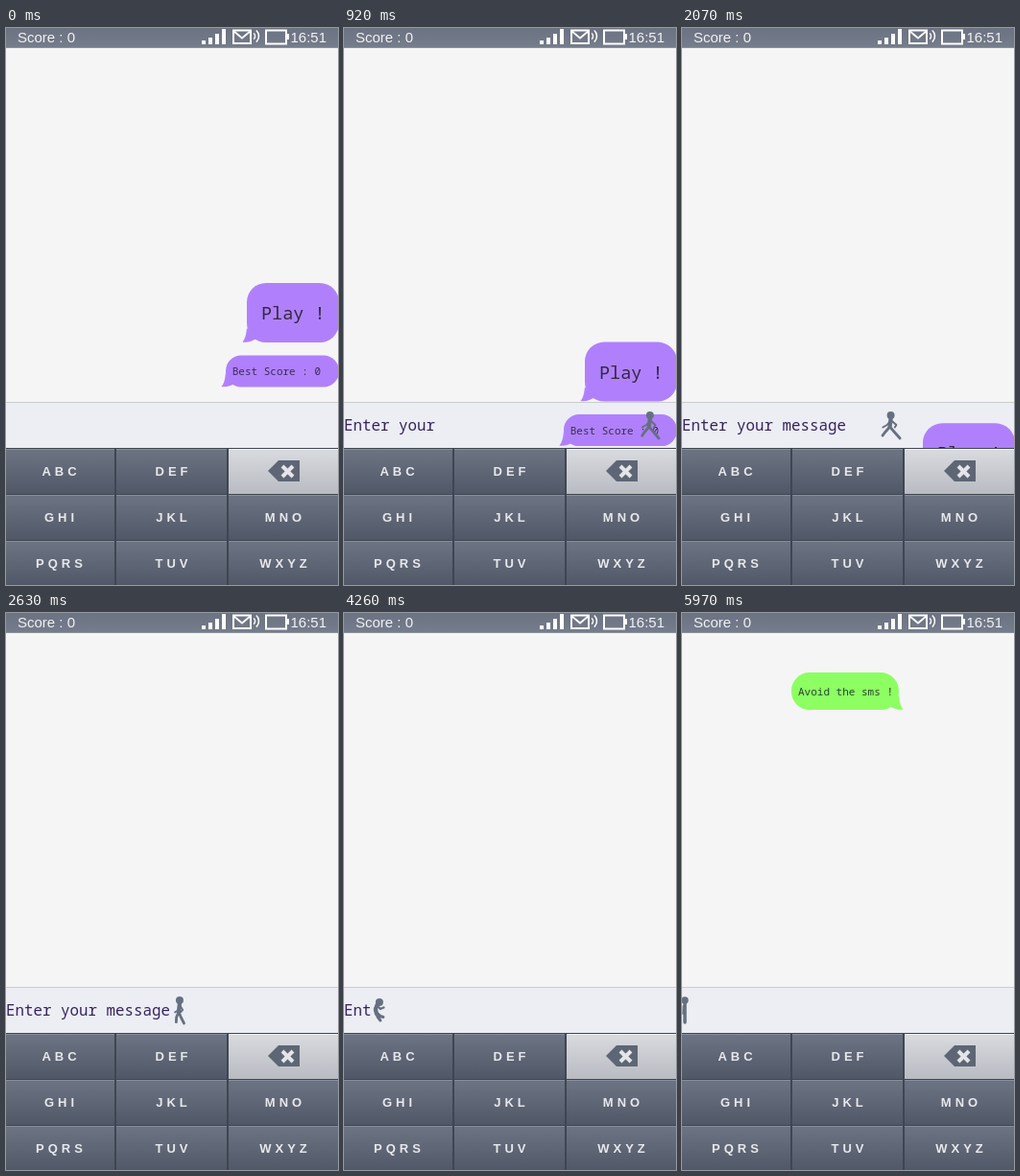
Write an HTML page with a canvas that moves like this. It is 346 px wide and 581 px high and loops after 6 s.

```html
<!DOCTYPE html>
<html lang="en">
<head>
<meta charset="utf-8">
<title>Text runner</title>
<style>
html, body { margin: 0; width: 100%; height: 100%; overflow: hidden; background: #f5f5f5; }
canvas { display: block; }
</style>
</head>
<body>
<canvas id="stage" width="346" height="581"></canvas>
<script>
const ctx = document.getElementById('stage').getContext('2d');
const W = 346, H = 581, LOOP = 6000;
const MONO = '"Noto Sans Mono", monospace';
const SANS = '"Liberation Sans", Arial, sans-serif';
const MESSAGE = 'Enter your message', CHAR = 9.5;
const FIGURE = '#667080';

const clamp = (v, a, b) => Math.min(b, Math.max(a, v));

function rect(x, y, w, h, fill) {
  ctx.fillStyle = fill;
  ctx.fillRect(x, y, w, h);
}

function shade(y0, y1, top, bottom) {
  const g = ctx.createLinearGradient(0, y0, 0, y1);
  g.addColorStop(0, top);
  g.addColorStop(1, bottom);
  return g;
}

function text(str, x, y, font, fill, spacing = 0) {
  ctx.font = font;
  ctx.letterSpacing = spacing + 'px';
  ctx.fillStyle = fill;
  ctx.fillText(str, x, y);
}

function line(width, color, ...p) {
  ctx.lineWidth = width;
  ctx.strokeStyle = color;
  ctx.beginPath();
  for (let i = 0; i < p.length; i += 2) ctx.lineTo(p[i], p[i + 1]);
  ctx.stroke();
}

function disc(x, y, r, fill) {
  ctx.fillStyle = fill;
  ctx.beginPath();
  ctx.arc(x, y, r, 0, 7);
  ctx.fill();
}

// side: -1 puts the tail at the lower left, 1 at the lower right
function bubble(x, y, w, h, r, fill, side) {
  ctx.fillStyle = fill;
  ctx.beginPath();
  ctx.roundRect(x, y, w, h, r);
  ctx.fill();
  const edge = side < 0 ? x : x + w, base = y + h;
  ctx.beginPath();
  ctx.moveTo(edge, base - 15);
  ctx.quadraticCurveTo(edge + side, base - 4, edge + side * 4.5, base - 0.5);
  ctx.quadraticCurveTo(edge - side * 3, base + 0.5, edge - side * 10, base - 4);
  ctx.closePath();
  ctx.fill();
}

function statusBar() {
  rect(0, 0, W, 20, shade(0, 20, '#6b7282', '#757c8b'));
  rect(0, 20, W, 1, '#8d93a0');
  text('Score : 0', 12, 14.5, '15px ' + SANS, '#f1f2f4');
  text('16:51', 296.5, 14.5, '15px ' + SANS, '#f1f2f4');
  [4, 7, 11, 16].forEach((h, i) => rect(204 + i * 7, 17 - h, 4, h, '#fff'));
  ctx.lineCap = 'butt';
  ctx.lineWidth = 2;
  ctx.strokeStyle = '#fff';
  ctx.strokeRect(237, 2.5, 18, 13.5);
  line(1.8, '#fff', 237, 3, 246, 10.5, 255, 3);
  ctx.lineWidth = 1.5;
  for (const r of [4, 8]) {
    ctx.beginPath();
    ctx.arc(255.5, 8.5, r, -0.85, 0.85);
    ctx.stroke();
  }
  ctx.lineWidth = 2;
  ctx.strokeRect(271, 2.5, 21, 14);
  rect(292, 6, 3, 6, '#fff');
}

function keyboard() {
  const labels = ['ABC', 'DEF', '', 'GHI', 'JKL', 'MNO', 'PQRS', 'TUV', 'WXYZ'];
  const left = [0, 115, 232], right = [113, 230, 346], mid = [55.5, 172.5, 289];
  rect(0, 438, W, H - 438, '#3f4652');
  labels.forEach((label, i) => {
    const c = i % 3, y = 439 + 48 * Math.floor(i / 3), x = left[c], w = right[c] - x;
    if (!label) {
      rect(x, y, w, 47, shade(y, y + 47, '#d9dbdf', '#b8bbc1'));
      rect(x, y, w, 1, '#eceef0');
      return;
    }
    rect(x, y, w, 47, shade(y, y + 47, '#6d7483', '#505766'));
    rect(x, y, w, 1, '#878e9b');
    ctx.font = 'bold 13px ' + SANS;
    ctx.letterSpacing = '4px';
    const width = ctx.measureText(label).width - 4;
    text(label, mid[c] - width / 2, y + 28, 'bold 13px ' + SANS, '#e6e8ec', 4);
  });
  ctx.fillStyle = '#5e6675';
  ctx.beginPath();
  [[273, 462], [284, 451], [306, 451], [306, 473], [284, 473]].forEach(p => ctx.lineTo(...p));
  ctx.fill();
  line(4, '#e3e5e8', 288, 457, 299, 468);
  line(4, '#e3e5e8', 299, 457, 288, 468);
}

// Horizontal position of the figure's head
function headX(t) {
  if (t < 2630) {
    const d = t - 920;
    return 319 - 0.1033 * d + 1.32e-5 * d * d;
  }
  if (t < 3320) {
    const u = clamp((3040 - t) / 410, 0, 1);
    return 174 + 7 * u * u;
  }
  return Math.max(3, 174 - 0.1457 * (t - 3320));
}

function stand(x) {
  line(3.5, FIGURE, x, 406, x, 427);
  line(1.8, FIGURE, x - 1.5, 410, x - 1.8, 418);
  disc(x, 404, 3.7, FIGURE);
}

function walk(x, t) {
  const s = Math.cos((t - 1610) * Math.PI / 220);
  const open = clamp((3040 - t) / 300, 0.15, 1);
  const hip = x - 1, a = s * open;
  line(4.2, FIGURE, x, 407, hip, 416);
  for (const k of [a, -a]) {
    line(2.8, FIGURE, hip, 416, hip - k * 5.5, 421.5 + Math.abs(k) * 0.5,
      hip + 1.5 - k * 9.5, 428 - Math.max(k, 0) * 3);
    line(2, FIGURE, x, 409, x + 1 + k * 5, 414, x - 2 + k * 6.5, 416.5);
  }
  disc(x, 404, 4, FIGURE);
}

function run(x, t) {
  const s = Math.cos((t - 4260) * Math.PI / 150);
  const k = (1 - s) / 2, hip = x - 3;
  line(4.2, FIGURE, x - 2, 408, x - 4, 413, hip, 418);
  line(2.4, FIGURE, x - 3, 409, x + 1 - k * 3, 413, x + 4.5, 411.5 + k * 3);
  line(2.2, FIGURE, x - 3, 409, x - 5 - k * 2, 414, x - 4 - k * 5, 416);
  line(3, FIGURE, hip, 417, x + 1, 420.5 + k, x + 4 + k * 3, 421.5 + k * 4);
  line(3, FIGURE, hip, 417, x - 2 - k * 5, 421, x + 1 - k * 9, 425 + k * 2);
  disc(x, 406 - k * 2, 4, FIGURE);
}

function typed(t, x) {
  if (t < 3320) return clamp(Math.floor((t - 85) / 70), 0, MESSAGE.length);
  return clamp(Math.floor((x - 2.5) / CHAR), 0, MESSAGE.length);
}

function draw(t) {
  const x = headX(t);
  rect(0, 0, W, H, '#f5f5f5');
  rect(0, 390, W, 1, '#cbccd0');
  rect(0, 391, W, 47, '#eceef4');
  text(MESSAGE.slice(0, typed(t, x)), 0, 420, CHAR / 0.6 + 'px ' + MONO, '#38225f');

  const fall = 0.0737 * Math.max(0, t - 85);
  bubble(251, 266 + fall, 96, 62, 20, '#b080fc', -1);
  text('Play !', 266, 304 + fall, '18.5px ' + MONO, '#33283f');
  bubble(229, 341.5 + fall, 118, 33, 16, '#b080fc', -1);
  text('Best Score : 0', 235.7, 362 + fall, '11px ' + MONO, '#3c2c55');

  const top = 62 + 0.0725 * (t - 5970);
  if (top > -25) {
    bubble(114, top, 112, 39, 19, '#8dff63', 1);
    text('Avoid the sms !', 121, top + 24, '11px ' + MONO, '#26472a');
  }

  ctx.lineCap = ctx.lineJoin = 'round';
  if (t > 3320 && x > 3) run(x, t);
  else if (t >= 3040) stand(x);
  else walk(x, t);
  ctx.lineJoin = 'miter';

  statusBar();
  keyboard();
}

function tick() {
  draw(performance.now() % LOOP);
  requestAnimationFrame(tick);
}
tick();
</script>
</body>
</html>
```
